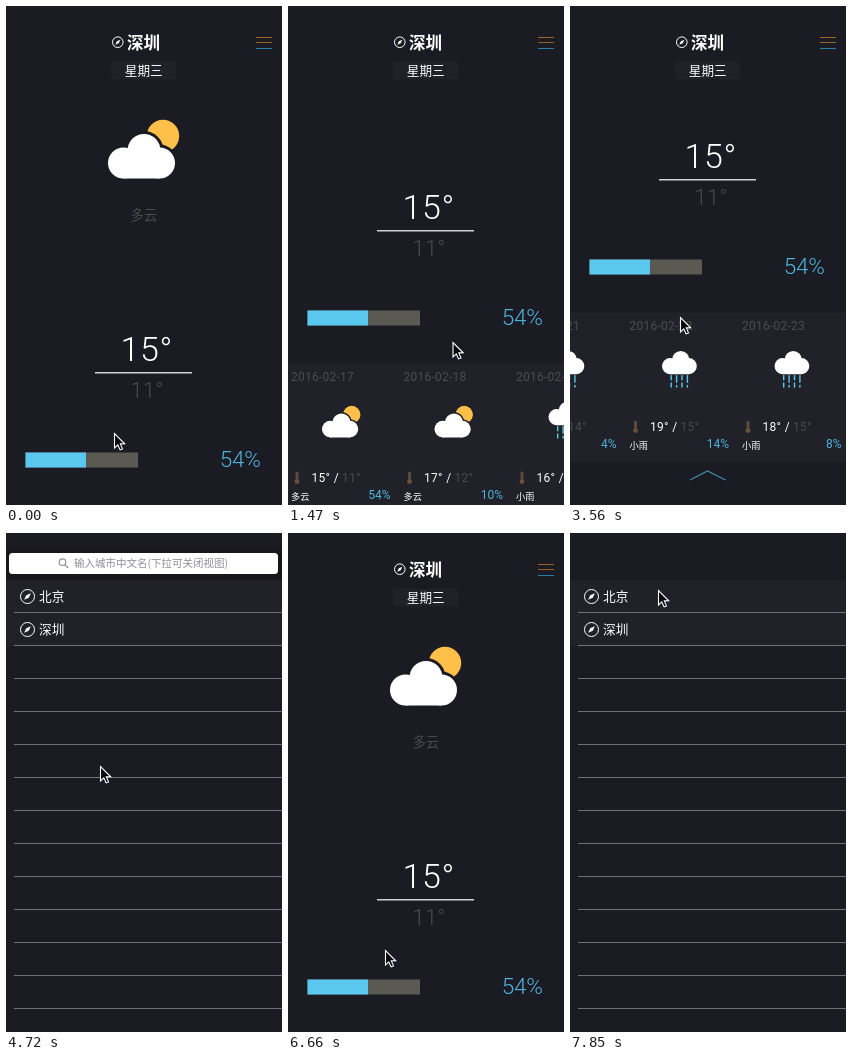
These frames come from a looping animation (276x499 px, 8000 ms). An HTML page with a canvas:

```html
<!DOCTYPE html>
<html lang="zh">
<head>
<meta charset="utf-8">
<title>天气</title>
<style>
html, body { margin: 0; width: 100%; height: 100%; overflow: hidden; background: #1b1b23; }
canvas { display: block; width: 276px; height: 499px; }
</style>
</head>
<body>
<canvas id="stage"></canvas>
<script>
const W = 276, H = 499, LOOP = 8000, STEP = 147.5, LAST = 53;
const BG = '#1b1b23', PANEL = '#212229', BLUE = '#4fb3dd', DIM = '#4b4b4b';
const LATIN = 'Roboto, sans-serif', HAN = '"Noto Sans CJK SC", "Noto Sans CJK", "Noto Sans", sans-serif';
const RAIN = [54, 10, 62, 35, 4, 14, 8];
const ARROW = new Path2D('M0 0V14.5L3.3 11.4 5.6 16.4 8 15.4 5.8 10.4 10.2 10.3Z');

// Where the pointer rests: step, x, y.
const STOPS = [[1, 108, 427], [5, 103, 321], [8, 104, 272], [10, 225, 400], [16, 26, 412],
  [24, 110, 311], [32, 94, 233], [45, 97, 417], [53, 88, 57]];

const canvas = document.getElementById('stage');
const ctx = canvas.getContext('2d');
const dpr = window.devicePixelRatio || 1;
canvas.width = W * dpr;
canvas.height = H * dpr;

const span = (n, a, b) => Math.min(1, Math.max(0, (n - a) / (b - a)));
const smooth = p => p * p * (3 - 2 * p);
const easeOut = p => 1 - (1 - p) ** 2;

function rect(x, y, w, h, color, r = 0) {
  ctx.fillStyle = color;
  ctx.beginPath();
  ctx.roundRect(x, y, w, h, r);
  ctx.fill();
}

function disc(x, y, r, color) {
  ctx.fillStyle = color;
  ctx.beginPath();
  ctx.arc(x, y, r, 0, Math.PI * 2);
  ctx.fill();
}

function ring(x, y, r, color, width = 1) {
  ctx.strokeStyle = color;
  ctx.lineWidth = width;
  ctx.beginPath();
  ctx.arc(x, y, r, 0, Math.PI * 2);
  ctx.stroke();
}

function line(points, color, width) {
  ctx.strokeStyle = color;
  ctx.lineWidth = width;
  ctx.beginPath();
  points.forEach(([x, y]) => ctx.lineTo(x, y));
  ctx.stroke();
}

function text(s, x, y, size, color, { font = LATIN, weight = 400, align = 'left', gap = 0 } = {}) {
  ctx.font = `${weight} ${size}px ${font}`;
  ctx.letterSpacing = gap + 'px';
  ctx.textAlign = align;
  ctx.fillStyle = color;
  ctx.fillText(s, x, y);
}

function han(s, x, y, size, color, opts) {
  text(s, x, y, size, color, { font: HAN, ...opts });
}

function place(x, y, scale, drawing) {
  ctx.save();
  ctx.translate(x, y);
  ctx.scale(scale, scale);
  drawing();
  ctx.restore();
}

function compass(x, y, r) {
  ring(x, y, r, '#fff');
  place(x, y, r, () => {
    ctx.rotate(-Math.PI / 4);
    ctx.fillStyle = '#fff';
    ctx.fill(new Path2D('M-.68 0L0 -.25 .68 0 0 .25Z'));
  });
}

// Cloud box is 67 x 45 with its corner at the origin.
function cloud(color, grow = 0) {
  disc(15.5, 29, 15.5 + grow, color);
  disc(36, 16.5, 16.5 + grow, color);
  disc(51.5, 29, 15.5 + grow, color);
  rect(15.5, 20, 36, 24.5 + grow, color);
}

function sunny(x, y, scale, back) {
  place(x, y, scale, () => {
    disc(55, 2, 16.2, '#ffc04a');
    cloud(back, 3);
    cloud('#fff');
  });
}

function rainy(x, y) {
  place(x, y, 0.52, () => cloud('#fff'));
  for (let i = 0; i < 4; i++) {
    const dx = x + 8.5 + i * 5.4, long = i % 2 ? 8 : 5.5;
    rect(dx, y + 24, 1.4, long, '#5ac8ee', 0.7);
    rect(dx, y + 25.8 + long, 1.4, 11 - long, '#5ac8ee', 0.7);
  }
}

function day(i, x, y) {
  const high = 15 + Math.floor(i / 2) + 2 * (i % 2), low = 11 + Math.round(i * 0.7);
  const wet = i > 1;
  text('2016-02-' + (17 + i), x, y + 17, 12, '#4c4c50', { gap: 0.25 });
  if (wet) rainy(x + 32.5, y + 38.5);
  else sunny(x + 31, y + 50, 0.54, PANEL);
  rect(x + 4.5, y + 108, 3, 8, '#5b4a3c', 1.5);
  disc(x + 6, y + 118, 2.4, '#6b5138');
  text(high + '° /', x + 20.5, y + 118.5, 12, '#fff', { gap: 0.3 });
  text(low + '°', x + 51, y + 118.5, 12, DIM, { gap: 0.3 });
  han(wet ? '小雨' : '多云', x, y + 136, 9.2, '#fff');
  text(RAIN[i] + '%', x + 99.5, y + 135.5, 12, BLUE, { align: 'right' });
}

function header() {
  compass(111.8, 36.2, 5.3);
  han('深圳', 121, 42.5, 16.5, '#fff', { weight: 700 });
  rect(105, 55.5, 65, 18, PANEL, 3);
  han('星期三', 118.8, 69, 12.6, '#fff');
  ['#a5621c', '#94601f', '#2880a8'].forEach((c, i) => rect(250, Math.round(31 + i * 5.4), 16, 1, c));
}

function forecast(y, slide, thumb) {
  rect(0, y, W, 150, PANEL);
  RAIN.forEach((_, i) => day(i, 3 + i * 112.5 - slide, y));
  ctx.globalAlpha = thumb;
  rect(slide * 0.35, y + 146, 99, 2.5, '#0c0c10', 1.2);
  ctx.globalAlpha = 1;
}

function weather({ scroll, slide, thumb, enter }) {
  header();
  ctx.save();
  ctx.beginPath();
  ctx.rect(0, 74.5, W, H);
  ctx.clip();
  ctx.translate(0, -Math.round(scroll));
  ctx.globalAlpha = 1 - span(scroll, 0, 90);
  sunny(102, 128, 1, BG);
  ctx.globalAlpha = 1;
  han('多云', 138, 214, 13.2, DIM, { align: 'center' });
  text('15°', 114.5, 355, 34, '#fff', { weight: 300, gap: 0.6 });
  rect(89, 366, 97, 1.4, '#d2d2d2');
  text('11°', 124.5, 392, 22, '#4a4a46', { weight: 300, gap: 0.2 });
  const away = 1 - enter, left = 19.5 - 19 * away;
  rect(left, 446.5, 112.5, 15, '#5a5a52');
  rect(left, 446.5, 60.5 * enter, 15, '#5ac8ee');
  text(Math.round(54 * enter) + '%', 254.5, 460.5 + 28 * away, 22.5, BLUE,
    { weight: 300, align: 'right', gap: -0.3 });
  forecast(499.5, slide, thumb);
  line([[120, 667], [137.5, 658], [155.5, 667]], '#3d8fac', 1.2);
  ctx.restore();
}

function cities(alpha, pull) {
  ctx.save();
  ctx.globalAlpha = alpha;
  ctx.translate(0, pull);
  ['北京', '深圳'].forEach((name, i) => {
    const y = 47 + i * 33;
    rect(0, y, W, 33, PANEL);
    compass(21.5, y + 16.5, 7);
    han(name, 33, y + 21, 12.7, '#fff');
  });
  for (let y = 79; y < 490; y += 33) rect(8, y, 268, 1, '#727276');
  ctx.restore();
}

function searchBar(alpha) {
  ctx.save();
  ctx.globalAlpha = alpha;
  rect(0, 13, W, 34, '#17171d');
  rect(3, 20, 269, 21, '#fff', 3.5);
  ring(56.5, 29.2, 3.3, '#8e8e93', 1.1);
  line([[59, 31.8], [62.2, 35]], '#8e8e93', 1.2);
  han('输入城市中文名(下拉可关闭视图)', 68, 34.2, 10.5, '#8e8e93');
  ctx.restore();
}

function pointer(n) {
  const next = Math.max(1, STOPS.findIndex(stop => stop[0] >= n));
  const [a, ax, ay] = STOPS[next - 1], [b, bx, by] = STOPS[next];
  const p = smooth(span(n, a, b));
  place(ax + (bx - ax) * p + 0.5, ay + (by - ay) * p + 0.5, 1, () => {
    ctx.fillStyle = '#08080b';
    ctx.fill(ARROW);
    ctx.strokeStyle = '#fff';
    ctx.lineWidth = 1.1;
    ctx.stroke(ARROW);
  });
}

function draw(n) {
  const fade = (a, b) => span(n, a, b);
  const reloaded = n > 36;
  const main = 1 - fade(24, 28) + fade(39, 44) - fade(48, 51);
  const list = fade(25, 29) - fade(34, 38) + fade(48, 52);
  const search = fade(28, 31) - fade(33, 36);

  ctx.setTransform(dpr, 0, 0, dpr, 0, 0);
  ctx.globalAlpha = 1;
  rect(0, 0, W, H, BG);
  weather({
    scroll: reloaded ? 193 * smooth(fade(45, 49))
      : 150 * easeOut(fade(1, 11.4)) + 43 * smooth(fade(20, 24)),
    slide: reloaded ? 0 : 506 * easeOut(fade(10, 16.9)),
    thumb: fade(10, 11) - fade(17, 20),
    enter: reloaded ? fade(39, 44) : 1
  });
  ctx.globalAlpha = 1 - main;
  rect(0, 0, W, H, BG);
  ctx.globalAlpha = 1;
  cities(list, 15 * smooth(fade(33, 37)) * (reloaded && n > 40 ? 0 : 1));
  searchBar(search);
  pointer(n);
}

// The screen is refreshed in even steps, not smoothly.
const start = performance.now();
function tick() {
  const t = (performance.now() - start) % LOOP;
  draw(Math.min(LAST, Math.floor(t / STEP + 0.02)));
  requestAnimationFrame(tick);
}
tick();
</script>
</body>
</html>
```
